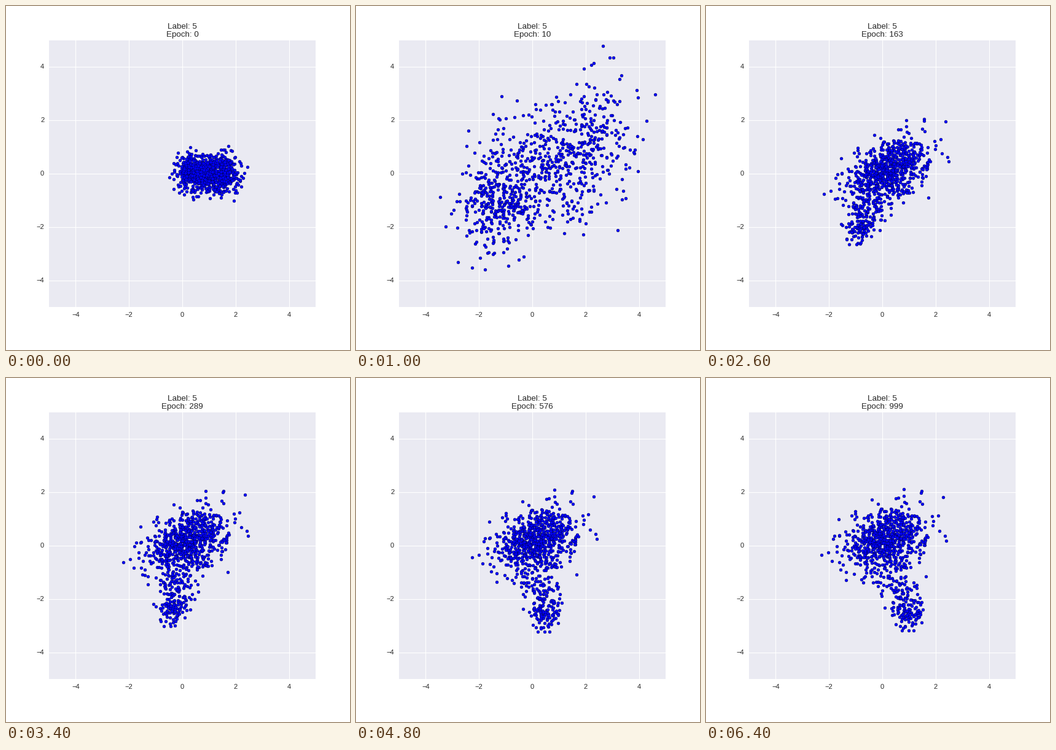
A matplotlib script that plays this animation: 560 px wide and 560 px high, repeating every 6.5 s.

```python
import numpy as np
import matplotlib.pyplot as plt
from matplotlib.animation import FuncAnimation

SIZE, DPI = 560, 80
FRAMES, INTERVAL = 65, 100
POINTS, TAIL = 892, 165
INK = "#262626"

plt.rcParams["font.family"] = "Liberation Sans"

rng = np.random.default_rng(5)
u, v, n = rng.normal(size=(3, POINTS))
flat = 1.6 * np.tanh(0.8 * u) + 0.36 * n    # evenly filled version of u
along = rng.uniform(size=(TAIL, 1)) ** 0.8
around = rng.normal(size=(TAIL, 2))


def ease(t):
    t = np.clip(t, 0, 1)
    return t * t * (3 - 2 * t)


def mix(a, b, t):
    return a + (b - a) * t


def blob(cx, cy, sx, sy, slant, major):
    """Slanted elliptical cloud whose long axis is filled by `major`."""
    minor = slant * major + np.sqrt(1 - slant ** 2) * v
    return np.column_stack([cx + sx * major, cy + sy * minor])


START = blob(0.95, 0, 0.6, 0.36, 0, flat)
WIDE = blob(0.6, 0.25, 1.6, 1.45, 0.5, flat)
WIDE[:TAIL] = (-1.4, -1.4) + 0.68 * around


def settled(i):
    """Compact cloud with a tail that swings from lower left to lower right."""
    turn = 1 - (1 - np.clip((i - 18) / 46, 0, 1)) ** 1.7
    pts = blob(mix(0.25, 0.12, turn), mix(0.06, 0.18, turn),
               0.73, 0.64, mix(0.52, 0.3, turn), u)
    angle = np.radians(mix(-46, 23, turn))
    reach = mix(1.95, 2.7, turn) * mix(0.4, 1, along)
    way = np.array([np.sin(angle), -np.cos(angle)])
    pts[:TAIL] = (0, -0.3) + reach * way + mix(0.42, 0.26, along) * around
    return pts


def cloud(i):
    swell = 1 + 0.1 * np.sin(np.pi * min(i / 10, 1))
    spread = mix(START, WIDE * swell, ease(i / 6))
    return mix(spread, settled(i), ease((i - 10) / 7))


def epoch_at(i):
    return i if i <= 10 else int(999.001 * ((i - 6) / 58) ** 1.702)


fig = plt.figure(figsize=(SIZE / DPI, SIZE / DPI), dpi=DPI, facecolor="white")
ax = fig.add_axes([0.125, 0.125, 0.775, 0.775], facecolor="#EAEAF2")
ax.set(xlim=(-5, 5), ylim=(-5, 5),
       xticks=range(-4, 5, 2), yticks=range(-4, 5, 2))
ax.set_axisbelow(True)
ax.grid(color="white", linewidth=1)
ax.tick_params(length=0, pad=7, labelsize=10, labelcolor=INK)
plt.setp(ax.get_yticklabels(), va="center")
for spine in ax.spines.values():
    spine.set_visible(False)


def heading(text, baseline):
    return fig.text(0.5125, 1 - baseline / SIZE, text, size=12, color=INK,
                    ha="center", va="baseline")


heading("Label: 5", 36.6)
epoch = heading("Epoch: 0", 50.4)
dots = ax.scatter(*START.T, s=20, c="blue", edgecolors="black",
                  linewidths=0.3)


def draw(i):
    dots.set_offsets(cloud(i))
    epoch.set_text(f"Epoch: {epoch_at(i)}")
    return dots, epoch


anim = FuncAnimation(fig, draw, frames=FRAMES, interval=INTERVAL,
                     repeat=True, repeat_delay=0)
plt.show()
```
